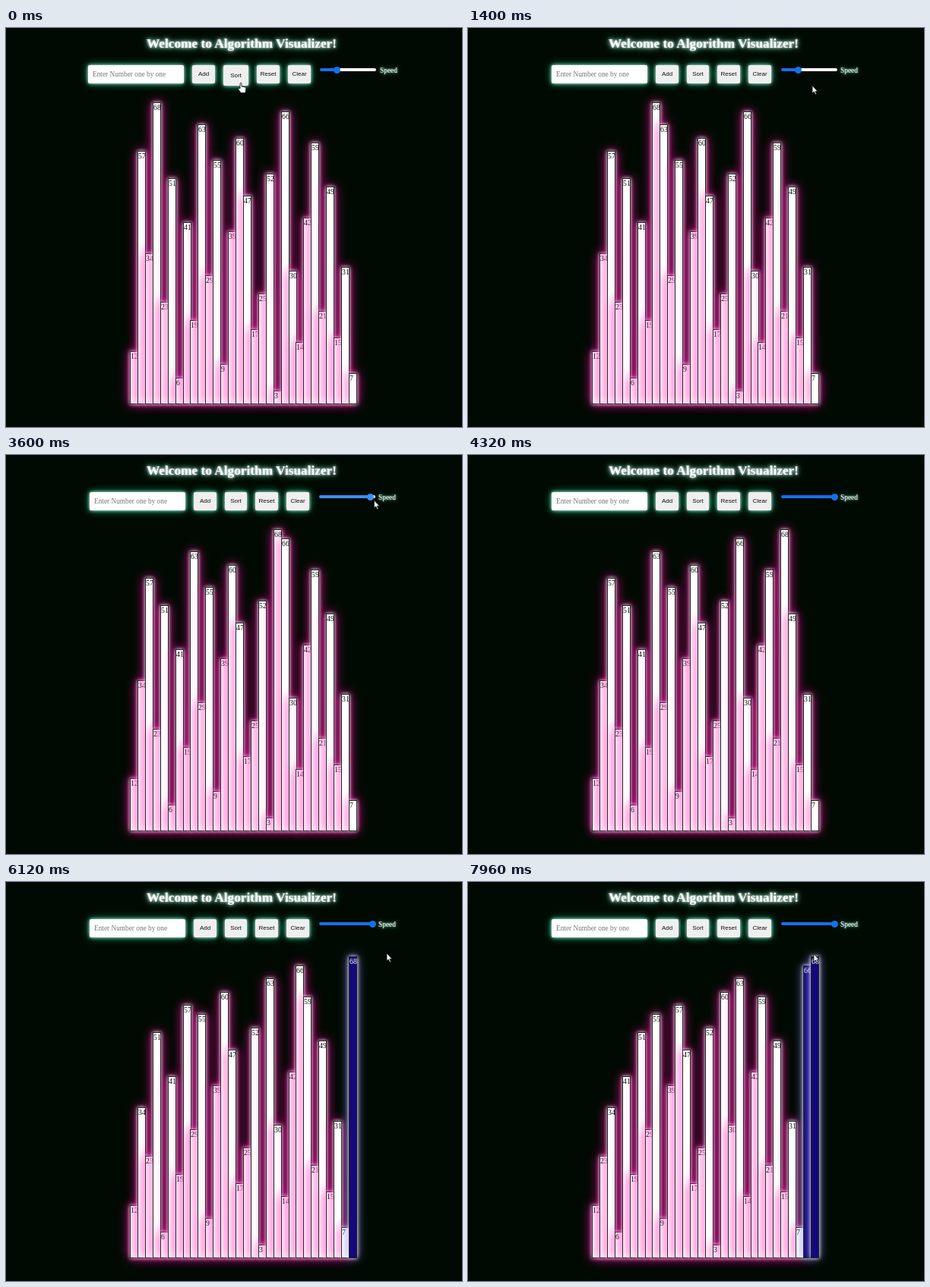
These frames come from a looping animation (600 by 526 pixels, 8000 ms). An HTML page:

```html
<!DOCTYPE html>
<html lang="en">
<head>
<meta charset="utf-8">
<title>Algorithm Visualizer</title>
<style>
html, body { margin: 0; width: 100%; height: 100%; overflow: hidden; background: #000a02; }
#stage { position: relative; width: 600px; height: 526px; overflow: hidden; font-family: "Liberation Serif", serif; }
#stage > *, .bar { position: absolute; box-sizing: border-box; white-space: nowrap; }
h1 { margin: 0; left: 185px; top: 11px; font-size: 17.3px; line-height: 20px; color: #fff;
  text-shadow: 0 0 3px #fff, 0 0 6px #cfe, 0 0 12px #1c9a6c; }
.box { top: 49px; height: 24px; border-radius: 2px; background: #efefef; color: #111; text-align: center;
  font: 8px/24px "Liberation Sans", sans-serif; box-shadow: 0 0 4px #d5ffee, 0 0 11px #12a873; }
#field { background: #fff; color: #757575; text-align: left; padding-left: 6px; font: 9.3px/24px "Liberation Serif", serif; }
#track { top: 53px; width: 74px; height: 4px; border-radius: 2px; }
#thumb { top: 50.5px; width: 9px; height: 9px; border-radius: 50%; }
#speed { top: 51px; font-size: 9.4px; line-height: 11px; color: #fff; text-shadow: 0 0 3px #cfe, 0 0 7px #1c9a6c; }
.bar { bottom: 30px; width: 11px; border: 1px solid #222; background: #fff; color: #111;
  font-size: 9.8px; line-height: 11px; box-shadow: 0 0 5px #fff, 0 0 15px #ff0aaa; }
.bar.done { background: #14087a; color: #fff; box-shadow: 0 0 5px #fff, 0 0 13px #7c7ce0; }
#cursor { left: 0; top: 0; overflow: visible; }
#cursor path { fill: #fff; stroke: #111; stroke-width: .8; stroke-linejoin: round; }
</style>
</head>
<body>
<div id="stage">
  <h1>Welcome to Algorithm Visualizer!</h1>
  <div class="box" id="field">Enter Number one by one</div>
  <div class="box" id="add">Add</div>
  <div class="box" id="sort">Sort</div>
  <div class="box" id="reset">Reset</div>
  <div class="box" id="clear">Clear</div>
  <div id="track"></div>
  <div id="thumb"></div>
  <div id="speed">Speed</div>
  <svg id="cursor" width="12" height="16">
    <path id="arrow" d="M0 0V10L2.3 8L4 11.7L5.5 11L3.9 7.4H7Z"/>
    <path id="hand" d="M-1 1Q0-.8 1 1V5L5.5 6Q7 6.4 6.8 8L6 13.5H0L-3.5 8.6Q-3.5 7-1 8Z"/>
  </svg>
</div>
<script>
const LOOP = 8000;
const values = [12, 57, 34, 68, 23, 51, 6, 41, 19, 63, 29, 55, 9, 39, 60,
  47, 17, 25, 52, 3, 66, 30, 14, 42, 59, 21, 49, 15, 31, 7];

// Each key is [time, ...values]
const progressKeys = [[0, 1.4], [4000, 21.4], [4320, 25.8], [5360, 40.4], [6120, 51.3], [LOOP, 76.9]];
const thumbKeys = [[0, 434], [2480, 434], [2520, 452], [2700, 452], [3700, 482]];
const hoverKeys = [[0, 1], [40, 1], [240, 0]];
const cursorKeys = [[0, 309, 72], [40, 309, 72], [400, 558, 96], [720, 516, 90], [960, 516, 90],
  [1400, 453, 76], [2000, 453, 76], [2400, 452, 58], [2700, 452, 58], [3700, 488, 60], [4000, 488, 60],
  [4260, 612, 84], [5140, 612, 116], [5360, 537, 106], [5960, 503, 92], [6120, 501, 94],
  [6800, 489, 97], [7480, 488, 99], [7680, 488, 99], [7960, 455, 95]];
const freezes = [[720, 960], [7480, 7680]];

const $ = id => document.getElementById(id);
const stage = $("stage");

const bars = values.map((_, i) => {
  const bar = document.createElement("div");
  bar.style.left = Math.round(163 + i * 9.93) + "px";
  stage.insertBefore(bar, $("cursor"));
  return bar;
});

function sample(keys, t) {
  const next = keys.findIndex(key => key[0] > t);
  if (next < 0) return keys[keys.length - 1].slice(1);
  const a = keys[next - 1], b = keys[next];
  const k = (t - a[0]) / (b[0] - a[0]);
  return a.slice(1).map((v, i) => v + (b[i + 1] - v) * k);
}

function bubbleSort(steps) {
  const list = values.slice();
  let sorted = 0, j = 0;
  while (steps-- > 0) {
    if (list[j] > list[j + 1]) [list[j], list[j + 1]] = [list[j + 1], list[j]];
    if (++j === list.length - 1 - sorted) {
      sorted++;
      j = 0;
    }
  }
  return { list, sorted };
}

function place(id, left, width) {
  $(id).style.left = left + "px";
  if (width) $(id).style.width = width + "px";
}

function drawControls(t) {
  const [hover] = sample(hoverKeys, t);
  const [thumb] = sample(thumbKeys, t);
  const shift = 2 * hover;
  place("field", 110 - shift, 126);
  place("add", 247 - shift, 30);
  place("sort", 288 - shift, 29 + 2 * shift);
  place("reset", 328 + shift, 30);
  place("clear", 369 + shift, 30);
  place("track", 412 + shift * .7);
  place("thumb", thumb - 4.5 + shift * .7);
  place("speed", 490 + shift);
  const sort = $("sort").style;
  sort.height = sort.lineHeight = 24 + 3 * hover + "px";

  const blue = t >= 2400 && t < 4000 ? "#3b8ff5" : "#1272ec";
  $("thumb").style.background = blue;
  $("track").style.background = `linear-gradient(90deg, ${blue} ${thumb - 412}px, #fff 0)`;
}

function drawBars(t) {
  const { list, sorted } = bubbleSort(Math.floor(sample(progressKeys, t)[0]));
  bars.forEach((bar, i) => {
    bar.className = i >= list.length - sorted ? "bar done" : "bar";
    bar.style.height = list[i] * 5.853 + "px";
    bar.textContent = list[i];
  });
}

function drawCursor(t) {
  const [x, y] = sample(cursorKeys, t);
  $("cursor").style.transform = `translate(${x}px, ${y}px)`;
  $("hand").style.display = t < 80 ? "" : "none";
  $("arrow").style.display = t < 80 ? "none" : "";
}

const start = performance.now();
function frame() {
  let t = Math.floor((performance.now() - start) % LOOP / 40) * 40;
  for (const [from, to] of freezes) if (t > from && t < to) t = from;
  drawControls(t);
  drawBars(t);
  drawCursor(t);
  requestAnimationFrame(frame);
}
frame();
</script>
</body>
</html>
```
